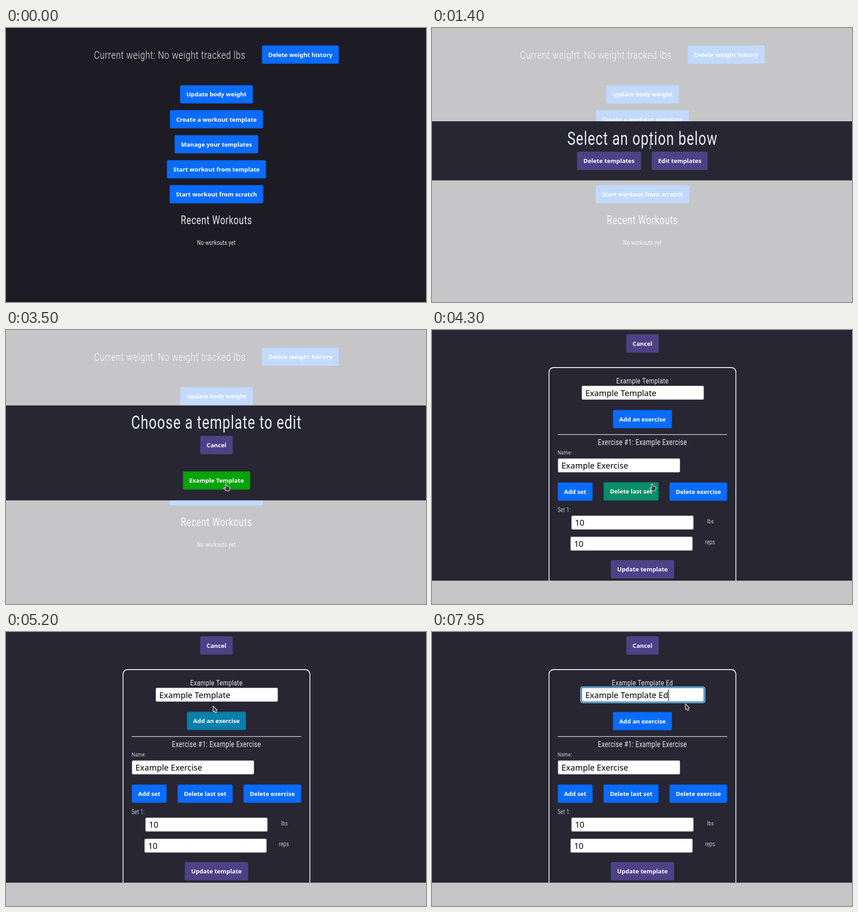
Write an HTML page with a canvas that moves like this. It is 926 by 605 pixels and loops after 8 s.

```html
<!DOCTYPE html>
<html lang="en">
<head>
<meta charset="utf-8">
<title>Workout templates</title>
<style>
html, body { margin: 0; width: 100%; height: 100%; overflow: hidden; background: #1d1b23; }
canvas { display: block; width: 926px; height: 605px; }
</style>
</head>
<body>
<canvas id="stage" width="926" height="605"></canvas>
<script>
const ctx = document.getElementById('stage').getContext('2d');
const W = 926, H = 605, LOOP = 8000, STEP = 50, MID = 464;
const SANS = '"Noto Sans", "Open Sans", sans-serif';
const NARROW = 'Roboto, "Liberation Sans", sans-serif';
const CONDENSE = 0.76, TRACKING = 0.038;
const BLUE = [10, 108, 255], PURPLE = [78, 65, 135], GREEN = [8, 163, 8];
const PANEL = '#272632', INK = '#ecedf8', SOFT = '#cfd0da';

// Pointer path: time, x, y, shape from that time on
const PATH = [
  [300, 888, 376, 'arrow'], [450, 556, 276, 'hand'], [700, 481, 260, 'hand'],
  [1400, 481, 260, 'beam'], [1500, 481, 260, 'beam'], [1600, 491, 274, 'hand'],
  [1850, 521, 292, 'hand'], [2550, 521, 292, 'arrow'], [2950, 521, 292, 'arrow'],
  [3100, 506, 314, 'hand'], [3400, 484, 339, 'hand'], [4400, 484, 339, 'arrow'],
  [4480, 480, 314, 'beam'], [4560, 478, 284, 'arrow'], [4800, 472, 214, 'hand'],
  [5050, 456, 178, 'hand'], [5080, 456, 175, 'arrow'], [5200, 456, 163, 'arrow'],
  [5300, 470, 154, 'beam'], [5550, 513, 142, 'beam'], [6950, 513, 142, 'beam'],
  [7050, 545, 153, 'beam'], [7100, 558, 158, 'arrow']
];
const ARROW = [[0, 0], [0, 12.5], [2.8, 11], [5, 15], [8, 13.6], [6.4, 10], [9, 9]];
const HAND = [[-0.6, 0.5], [1.6, 0.5], [2.4, 5], [8.5, 6.8], [9.5, 9], [7.5, 15.5],
  [1, 15.5], [-4.6, 10], [-3.4, 8.4], [0, 10]];

const clamp = v => Math.max(0, Math.min(1, v));
const easeOut = v => 1 - (1 - clamp(v)) ** 2;
const mix = (a, b, p) => a.map((v, i) => Math.round(v + (b[i] - v) * p));

// Hover strength of a button entered and left at the given times
function hover(t, enter, leave = Infinity) {
  return t < leave ? easeOut((t - enter) / 300) : 1 - easeOut((t - leave) / 300);
}

function box(x, y, w, h, r, fill) {
  ctx.beginPath();
  ctx.roundRect(x, y, w, h, r);
  ctx.fillStyle = fill;
  ctx.fill();
}

function label(text, x, base, size, { weight = 400, align = 'center', color = INK } = {}) {
  ctx.save();
  ctx.translate(x, base);
  ctx.scale(CONDENSE, 1);
  ctx.font = `${weight} ${size}px ${NARROW}`;
  ctx.letterSpacing = `${size * TRACKING}px`;
  ctx.textAlign = align;
  ctx.fillStyle = color;
  ctx.fillText(text, 0, 0);
  ctx.restore();
}

function button(text, cx, top, color = BLUE, lift = 0) {
  ctx.font = `700 13.15px ${SANS}`;
  const w = ctx.measureText(text).width + 28, h = 40.5;
  const x = cx - w / 2, y = top - 1.5 * lift;
  box(x, y, w, h, 3, `rgb(${mix(color, GREEN, lift)})`);
  ctx.beginPath();
  ctx.roundRect(x + 1, y + 1, w - 2, h - 2, 2);
  ctx.strokeStyle = color === PURPLE ? 'rgba(50,90,110,.3)' : 'rgba(0,40,80,.15)';
  ctx.lineWidth = 2;
  ctx.stroke();
  ctx.textAlign = 'center';
  ctx.fillStyle = '#fff';
  ctx.fillText(text, cx, y + 25.2);
}

function field(text, x, y, focused = false) {
  const w = 269.5, h = 31;
  if (focused) {
    box(x - 3, y - 2.5, w + 6, h + 5.5, 5, '#b9dcf0');
    box(x - 1.7, y - 1.3, w + 3.4, h + 3, 4, '#1a80c2');
    box(x + 0.7, y + 0.8, w - 1.4, h - 1.4, 2, '#fff');
  } else {
    box(x, y, w, h, 3, '#b4b4ba');
    box(x + 1, y + 1, w - 2, h - 2, 2, '#fff');
  }
  ctx.font = `18.2px ${SANS}`;
  ctx.textAlign = 'left';
  ctx.fillStyle = '#000';
  ctx.fillText(text, x + 8, y + 22.6);
  if (focused) ctx.fillRect(Math.round(x + 8 + ctx.measureText(text).width), y + 4, 1.3, 25);
}

function band(top, bottom) {
  ctx.fillStyle = 'rgba(255,255,255,.75)';
  ctx.fillRect(0, 0, W, H);
  ctx.fillStyle = PANEL;
  ctx.fillRect(0, top, W, bottom - top);
}

function home(t) {
  ctx.fillStyle = '#1d1b23';
  ctx.fillRect(0, 0, W, H);
  label('Current weight: No weight tracked lbs', 194, 67.5, 24.8, { weight: 300, align: 'left' });
  button('Delete weight history', 649, 38.5);
  ['Update body weight', 'Create a workout template', 'Manage your templates',
    'Start workout from template', 'Start workout from scratch'].forEach((text, i) => {
    button(text, MID, 126.2 + 55.15 * i, BLUE, i === 2 ? hover(t, 450, 1400) : 0);
  });
  label('Recent Workouts', MID, 433, 25.4);
  label('No workouts yet', MID, 478.5, 14.3);
}

function options(t) {
  band(206, 336.5);
  label('Select an option below', MID, 257.5, 40);
  button('Delete templates', 390.2, 273, PURPLE);
  button('Edit templates', 546.2, 273, PURPLE, hover(t, 1600));
}

function chooser(t) {
  band(166.6, 376.2);
  label('Choose a template to edit', MID, 218, 40);
  button('Cancel', MID, 233.8, PURPLE);
  button('Example Template', MID + 0.2, 313.5, BLUE, hover(t, 3120));
}

function editor(t) {
  const typed = t < 7550 ? '' : t < 7800 ? ' ' : t < 7950 ? ' E' : ' Ed';
  const name = 'Example Template' + typed;
  band(0, 553.5);
  ctx.save();
  ctx.beginPath();
  ctx.rect(0, 0, W, 553.5);
  ctx.clip();
  ctx.beginPath();
  ctx.roundRect(258, 83, 412, 520, 10);
  ctx.strokeStyle = '#f4f4fa';
  ctx.lineWidth = 1.8;
  ctx.stroke();
  ctx.restore();

  button('Cancel', MID, 9.5, PURPLE);
  label(name.trim(), MID, 118, 17.2);
  field(name, 330, 123, t >= 6950);
  button('Add an exercise', MID, 176.5, BLUE, hover(t, 4780, 5077));
  ctx.fillStyle = '#d3d3da';
  ctx.fillRect(277, 230, 374, 1.5);
  label('Exercise #1: Example Exercise', MID, 253.5, 17.8);
  label('Name:', 277, 275.3, 13.6, { align: 'left', color: SOFT });
  field('Example Exercise', 277.5, 283.5);
  button('Add set', 315.7, 336.8);
  button('Delete last set', 439, 336.8, BLUE, hover(t, 4190, 4400));
  button('Delete exercise', 587.2, 336.8);
  label('Set 1:', 277, 401.7, 13.8, { align: 'left', color: SOFT });
  field('10', 307.2, 409.7);
  label('lbs', 614, 426.5, 13.6, { color: SOFT });
  field('10', 305.2, 456.2);
  label('reps', 613, 472.7, 13.8, { color: SOFT });
  button('Update template', MID, 508, PURPLE);
}

function pointer(t) {
  if (t < PATH[0][0]) return;
  const i = PATH.findLastIndex(k => k[0] <= t);
  const a = PATH[i], b = PATH[i + 1] || a;
  const p = b === a ? 0 : (t - a[0]) / (b[0] - a[0]);
  const [x, y] = mix([a[1], a[2]], [b[1], b[2]], p);
  ctx.save();
  ctx.translate(x + 0.5, y + 0.5);
  ctx.lineJoin = 'round';
  ctx.beginPath();
  if (a[3] === 'beam') {
    ctx.moveTo(-2, -6); ctx.lineTo(2, -6);
    ctx.moveTo(0, -6); ctx.lineTo(0, 5);
    ctx.moveTo(-2, 5); ctx.lineTo(2, 5);
    ctx.strokeStyle = '#e8e8e8';
    ctx.lineWidth = 2.6;
    ctx.stroke();
    ctx.strokeStyle = '#333';
  } else {
    (a[3] === 'hand' ? HAND : ARROW).forEach(q => ctx.lineTo(...q));
    ctx.closePath();
    ctx.fillStyle = '#3c3c3c';
    ctx.fill();
    ctx.strokeStyle = '#f2f2f2';
  }
  ctx.lineWidth = 1.1;
  ctx.stroke();
  ctx.restore();
}

function draw(now) {
  const t = Math.floor((now % LOOP) / STEP) * STEP;
  home(t);
  if (t >= 4300) editor(t);
  else if (t >= 2550) chooser(t);
  else if (t >= 1400) options(t);
  pointer(t);
}

const start = performance.now();
function tick() {
  draw(performance.now() - start);
  requestAnimationFrame(tick);
}
tick();
</script>
</body>
</html>
```
